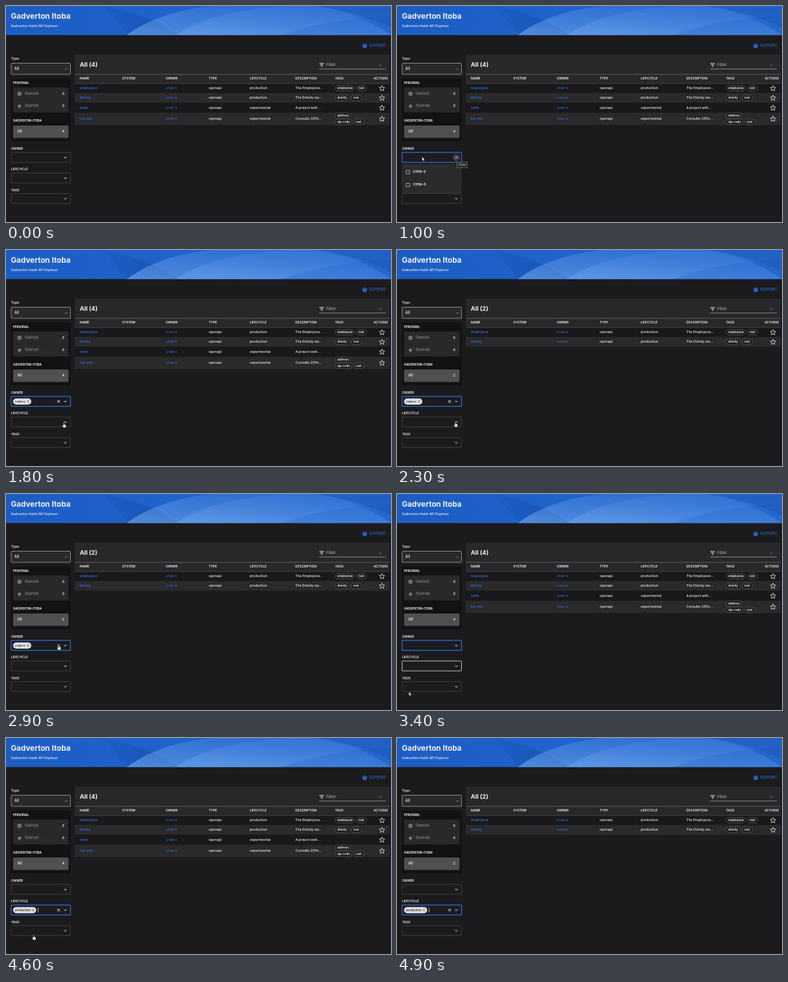
Recreate the animation shown at these times as an HTML page. Size 600 px wide and 338 px high, loop 5 s.

```html
<!DOCTYPE html>
<html lang="en">
<head>
<meta charset="utf-8">
<title>API Explorer</title>
<style>
html, body { margin: 0; width: 100%; height: 100%; overflow: hidden; background: #1b1b1d; }
svg { display: block; width: 100vw; height: 100vh; }
text { font: 500 5.2px Inter, "Open Sans", sans-serif; fill: #f2f2f2; }
.h { font-weight: 600; font-size: 4.9px; }
.b { font-weight: 700; }
.link { fill: #2d6bd8; }
.strong { font-weight: 600; }
.tag { font-size: 4.6px; font-weight: 600; }
.dim { fill: #858587; }
.opt { font-size: 5.8px; font-weight: 600; }
.box { fill: #1c1c1e; stroke: #48484a; stroke-width: .8; }
.line { fill: none; stroke: #f0f0f0; stroke-width: 1; }

/* one loop is 5 s: 2% is 100 ms */
.anim { animation: 5s step-end infinite; }
.flip { transform-box: fill-box; transform-origin: center; }
.all { animation-name: all; }
.few { animation-name: few; }
.owner-box { animation-name: owner-box; }
.life-box { animation-name: life-box; }
.owner-menu { animation-name: owner-menu; }
.life-menu { animation-name: life-menu; }
.owner-flip { animation-name: owner-flip; }
.life-flip { animation-name: life-flip; }
.owner-halo { animation-name: owner-halo; }
.life-halo { animation-name: life-halo; }
.owner-caret { animation-name: owner-caret; }
.life-caret { animation-name: life-caret; }
.owner-chip { animation-name: owner-chip; }
.life-chip { animation-name: life-chip; }
.owner-pick { animation-name: owner-pick; }
.first-pick { animation-name: first-pick; }
.last-pick { animation-name: last-pick; }
.tip { animation-name: tip; }
.pointer { animation-name: pointer; }
.arrow { animation-name: arrow; }
.hand { animation-name: hand; }

@keyframes all { 0%, 62% { visibility: visible } 40%, 94%, 100% { visibility: hidden } }
@keyframes few { 0%, 62% { visibility: hidden } 40%, 94%, 100% { visibility: visible } }
@keyframes owner-box {
  0%, 74%, 100% { stroke: #48484a; stroke-width: .8 }
  6% { stroke: #eee; stroke-width: .8 }
  12% { stroke: #2f6fe0; stroke-width: 1.2 }
}
@keyframes life-box {
  0%, 52% { stroke: #48484a; stroke-width: .8 }
  48%, 66% { stroke: #eee; stroke-width: .8 }
  76%, 100% { stroke: #2f6fe0; stroke-width: 1.2 }
}
@keyframes owner-menu { 0%, 36%, 100% { visibility: hidden } 14% { visibility: visible } }
@keyframes life-menu { 0%, 92%, 100% { visibility: hidden } 76% { visibility: visible } }
@keyframes owner-flip { 0%, 36%, 100% { transform: none } 14% { transform: scaleY(-1) } }
@keyframes life-flip { 0%, 92%, 100% { transform: none } 76% { transform: scaleY(-1) } }
@keyframes owner-halo { 0%, 24%, 100% { visibility: hidden } 6% { visibility: visible } }
@keyframes life-halo { 0%, 84%, 100% { visibility: hidden } 76% { visibility: visible } }
@keyframes owner-caret { 0%, 20%, 36%, 100% { visibility: hidden } 14%, 24% { visibility: visible } }
@keyframes life-caret { 0%, 92%, 100% { visibility: hidden } 76% { visibility: visible } }
@keyframes owner-chip { 0%, 60%, 100% { visibility: hidden } 36% { visibility: visible } }
@keyframes life-chip { 0% { visibility: hidden } 92%, 100% { visibility: visible } }
@keyframes owner-pick { 0%, 36%, 100% { visibility: hidden } 24% { visibility: visible } }
@keyframes first-pick { 0%, 86%, 100% { visibility: hidden } 78% { visibility: visible } }
@keyframes last-pick { 0%, 92%, 100% { visibility: hidden } 86% { visibility: visible } }
@keyframes tip { 0%, 22%, 100% { visibility: hidden } 14% { visibility: visible } }
@keyframes pointer {
  0% { transform: translate(62px, 259px) }
  4% { transform: translate(84px, 246px) }
  6% { transform: translate(92px, 236px) }
  18% { transform: translate(70px, 238px) }
  20% { transform: translate(39px, 236px) }
  24% { transform: translate(50px, 252px) }
  28% { transform: translate(75px, 262px) }
  32% { transform: translate(90px, 270px) }
  46% { transform: translate(91px, 269px) }
  48% { transform: translate(80px, 285px) }
  50% { transform: translate(60px, 305px) }
  52% { transform: translate(62px, 311px) }
  54% { transform: translate(75px, 275px) }
  56% { transform: translate(80px, 245px) }
  58% { transform: translate(82px, 236px) }
  64% { transform: translate(52px, 268px) }
  66% { transform: translate(30px, 292px) }
  68% { transform: translate(18.5px, 309.5px) }
  70% { transform: translate(25px, 300px) }
  72% { transform: translate(33px, 284px) }
  74%, 76% { transform: translate(42.5px, 270px) }
  84% { transform: translate(43px, 290px) }
  86%, 100% { transform: translate(43px, 308px) }
}
@keyframes arrow {
  0%, 6%, 24%, 54%, 72%, 100% { visibility: hidden }
  2%, 18%, 50%, 66% { visibility: visible }
}
@keyframes hand {
  0%, 18%, 50%, 66%, 96%, 100% { visibility: hidden }
  6%, 24%, 54%, 72% { visibility: visible }
}
</style>
</head>
<body>
<svg viewBox="0 0 600 338" preserveAspectRatio="none">
  <defs>
    <linearGradient id="sky"><stop stop-color="#1c5dc4"/><stop offset=".4" stop-color="#1f62c9"/><stop offset="1" stop-color="#2668cf"/></linearGradient>
    <linearGradient id="wave" x1="0" x2="1" y1="1" y2="0"><stop stop-color="#78aef2" stop-opacity=".6"/><stop offset="1" stop-color="#4d8be2" stop-opacity=".12"/></linearGradient>
    <linearGradient id="deep" x1="0" x2="1"><stop stop-color="#124aa8" stop-opacity=".1"/><stop offset="1" stop-color="#124aa8" stop-opacity=".65"/></linearGradient>
    <path id="star" d="M0-4.2 1.2-1.3 4.2-1.1 1.9.9 2.6 3.9 0 2.3-2.6 3.9-1.9.9-4.2-1.1-1.2-1.3Z"/>
    <path id="down" d="M-2-1 0 1 2-1"/>
    <path id="cross" d="M-2-2 2 2M2-2-2 2"/>
  </defs>

  <rect width="600" height="45.5" fill="url(#sky)"/>
  <path d="M150 0C195 8 240 24 268 45.5H190C177 30 162 13 150 0Z" fill="url(#deep)"/>
  <path d="M188 45.5C225 18 275 4 322 0H490C535 10 575 27 600 45.5Z" fill="url(#wave)"/>
  <path d="M265 45.5C310 14 390 0 455 0H600V16C535 17 480 28 430 45.5Z" fill="url(#wave)" opacity=".65"/>
  <path d="M480 0H600V34C570 20 530 6 480 0Z" fill="#174fae" opacity=".4"/>
  <text class="b" x="7.5" y="19.5" style="font-size:11.8px">Gadverton Itoba</text>
  <text x="7.5" y="32.8">Gadverton-ItobA API Explorer</text>

  <circle cx="559" cy="62.3" r="3.4" fill="#2d6bd8"/>
  <text class="b" x="557.5" y="64.2" style="font-size:5px;fill:#1b1b1d">?</text>
  <text class="link" x="566" y="64.2" style="font-size:5.5px">SUPPORT</text>

  <g id="side">
    <text class="strong" x="8" y="83.8">Type</text>
    <rect x="8" y="89.5" width="92.5" height="17.5" rx="1" fill="#29292b" stroke="#a8a8aa" stroke-width=".8"/>
    <text x="13" y="100" style="font-size:6px">All</text>
    <use href="#down" class="line" transform="translate(94 98.5)" style="stroke:#8b8b8d"/>
    <rect x="8" y="113.5" width="92.5" height="98.5" rx="1.5" fill="#121213"/>
    <text class="b" x="11" y="122" style="font-size:4.6px">PERSONAL</text>
    <rect x="11" y="127.5" width="86.5" height="39" rx="1.5" fill="#29292b"/>
    <path d="M11 147H97.500" stroke="#1f1f20" stroke-width=".6"/>
    <circle cx="21" cy="137.300" r="2" fill="none" stroke="#858587" stroke-width="1.8"/>
    <circle cx="21" cy="137.300" r="3.1" fill="none" stroke="#858587" stroke-width="1" stroke-dasharray="1.6 1.65"/>
    <use href="#star" fill="#858587" transform="translate(21 156.500) scale(.85)"/>
    <text class="dim" x="29" y="139" style="font-size:6.2px">Owned</text>
    <text class="dim" x="29" y="158.200" style="font-size:6.2px">Starred</text>
    <text class="strong" x="87.500" y="139.200">0</text>
    <text class="strong" x="87.500" y="158.400">0</text>
    <text class="b" x="11" y="181.300" style="font-size:4.5px">GADVERTON-ITOBA</text>
    <rect x="11" y="187" width="86.500" height="19.500" rx="1.500" fill="#505052"/>
    <text x="17.500" y="198.200" style="font-size:6px">All</text>
    <text class="strong anim all" x="87.500" y="198.300">4</text>
    <text class="strong anim few" x="87.500" y="198.300">2</text>
  </g>

  <rect x="107" y="76" width="491" height="45.500" rx="1.500" fill="#28282a"/>
  <text class="b anim all" x="115" y="94.800" style="font-size:9.400px">All (4)</text>
  <text class="b anim few" x="115" y="94.800" style="font-size:9.400px">All (2)</text>
  <path class="line" d="M488.500 90H495.500M489.700 92.300H494.300M491 94.600H493"/>
  <text x="499" y="94.300" style="font-size:6.200px;fill:#a5a5a7">Filter</text>
  <use href="#cross" class="line" transform="translate(583.300 92.500)" style="stroke:#6b6b6d;stroke-width:.8"/>
  <path d="M488 98.600H592" stroke="#a0a0a2" stroke-width=".8"/>
  <path d="M107 107H598M107 121.300H598" stroke="#77777a" stroke-width=".7"/>
  <g id="table"></g>
  <g id="filters"></g>
  <g id="menus"></g>

  <g class="anim tip">
    <rect x="93.800" y="244.500" width="15.500" height="8.500" fill="#242425" stroke="#858587" stroke-width=".7"/>
    <text x="96" y="250.400" style="font-size:4.400px;fill:#c8c8c8">Close</text>
  </g>
  <g class="anim pointer" stroke="#111" stroke-width=".5" fill="#fff">
    <path class="anim arrow" d="M0 0V6.100L1.400 4.900 2.400 7 3.500 6.500 2.500 4.500H4.400Z"/>
    <path class="anim hand" d="M-.700.500Q0-.400.600.500V3L3 3.600Q3.700 3.900 3.600 4.800L3 8H-.500L-2.500 5Q-2.400 4-1.500 4.500L-.700 5.200Z"/>
  </g>
</svg>
<script>
const put = (id, html) => document.getElementById(id).innerHTML += html;
const rect = (x, y, w, h, attrs) => `<rect x="${x}" y="${y}" width="${w}" height="${h}" ${attrs}/>`;
const text = (x, y, s, cls = '') => `<text x="${x}" y="${y}" class="${cls}">${s}</text>`;
const icon = (id, x, y, style = '') =>
  `<use href="#${id}" class="line" transform="translate(${x} ${y})" style="${style}"/>`;

const cols = [115, 181, 249, 316, 380, 451, 513, 573];
const heads = ['NAME', 'SYSTEM', 'OWNER', 'TYPE', 'LIFECYCLE', 'DESCRIPTION', 'TAGS', 'ACTIONS'];
put('table', heads.map((s, i) => text(cols[i], 115.3, s, 'h')).join(''));

const pill = (x, y, w, s) =>
  rect(x, y - 4.3, w, 8.6, 'rx="4.3" fill="#1d1d1f" stroke="#68686a" stroke-width=".6"') +
  text(x + 3.2, y + 1.5, s, 'tag');

function row(top, h, name, owner, stage, note, tags, shade) {
  const mid = top + h / 2, y = mid + 1.3;
  return rect(107, top, 491, h, `fill="${shade ? '#2a2a2c' : '#19191b'}"`) +
    text(cols[0], y, name, 'link strong') + text(cols[2], y, owner, 'link') +
    text(cols[3], y, 'openapi') + text(cols[4], y, stage) + text(cols[5], y, note) +
    tags.map(([x, dy, w, s]) => pill(x, mid + dy, w, s)).join('') +
    icon('star', 586, mid, 'stroke-width:.8');
}

put('table',
  row(121.5, 14.5, 'employees', 'crew-e', 'production', 'The Employees...',
    [[513, 0, 30, 'employees'], [546, 0, 16, 'rest']], false) +
  row(136, 15.5, 'dolvity', 'crew-e', 'production', 'The Dolvity we...',
    [[513, 0, 22, 'dolvity'], [538, 0, 16, 'rest']], true) +
  '<g class="anim all">' +
  row(151.5, 15.5, 'teste', 'crew-o', 'experimental', 'A project with...', [], false) +
  row(167, 19, 'luz-mor', 'crew-o', 'experimental', 'Consulte CEPs...',
    [[513, -5, 24, 'address'], [513, 4.8, 26, 'zip-code'], [542, 4.8, 16, 'rest']], true) +
  '</g>');

function filter(y, label, key, chip, w, caretX) {
  const mid = y + 8;
  let out = text(8, y - 4, label, 'h') + rect(8, y, 92.5, 15.6, `rx="1" class="box anim ${key}-box"`);
  if (chip) {
    out += `<circle class="anim ${key}-halo" cx="92.500" cy="${mid}" r="5.500" fill="#414143"/>` +
      `<g class="anim ${key}-chip">` + rect(11, mid - 4.9, w, 9.8, 'rx="4.9" fill="#dededf"') +
      `<text class="tag" x="14" y="${mid + 1.4}" style="fill:#333">${chip}</text>` +
      `<circle cx="${w + 6}" cy="${mid}" r="2.100" fill="#a5a5a7"/>` +
      icon('cross', w + 6, mid, 'stroke:#e5e5e6;stroke-width:.8;r:1').replace('" style', ' scale(.45)" style') +
      icon('cross', 82, mid) + (caretX ? rect(caretX, mid - 4, .7, 8, 'fill="#eee"') : '') + '</g>' +
      rect(12.5, mid - 4, .7, 8, `fill="#eee" class="anim ${key}-caret"`);
  }
  return out + `<g transform="translate(92.500 ${mid})"><use href="#down" class="line flip anim ${key}-flip"/></g>`;
}

put('filters',
  filter(229.1, 'OWNER', 'owner', 'crew-e', 28.5, 0) +
  filter(261.3, 'LIFECYCLE', 'life', 'production', 36, 49.6) +
  filter(293.5, 'TAGS', 'tags'));

function menu(y, key, items, picks) {
  const rows = items.map((s, i) => {
    const mid = y + 12.6 + i * 20;
    const pick = picks[i] ? rect(8, mid - 10.5, 92.5, 20.5, `fill="#3d3d3f" class="anim ${picks[i]}"`) : '';
    const halo = picks[i] === 'owner-pick'
      ? `<circle cx="17" cy="${mid}" r="6.500" fill="#505052" class="anim owner-pick"/>` : '';
    return pick + halo + rect(14.3, mid - 2.6, 5.4, 5.4, 'rx=".6" fill="none" stroke="#b5b5b7" stroke-width=".9"') +
      text(25, mid + 1.2, s, 'opt');
  });
  return `<g class="anim ${key}-menu">` +
    rect(8, y, 92.5, 46, 'rx="1" fill="#2b2b2d"') + rows.join('') + '</g>';
}

put('menus',
  menu(247.3, 'owner', ['crew-e', 'crew-o'], ['owner-pick']) +
  menu(279.3, 'life', ['experimental', 'production'], ['first-pick', 'last-pick']));
</script>
</body>
</html>
```
